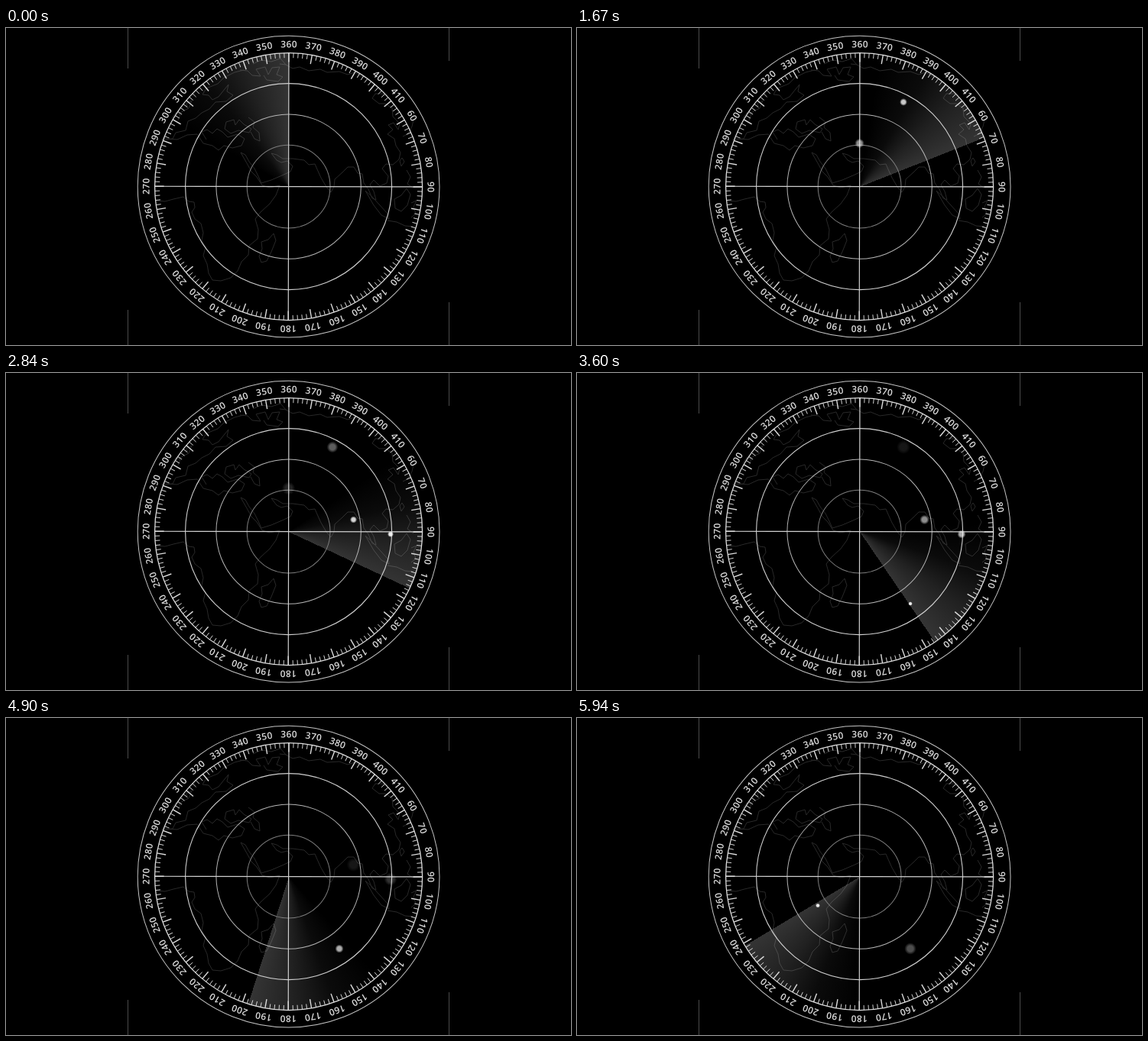
Write an HTML page that moves like this. It is 739 px wide and 415 px high and loops after 5.97 s.

```html
<!DOCTYPE html>
<html lang="en">
<head>
<meta charset="utf-8">
<title>Radar sweep</title>
<style>
  html, body { margin: 0; width: 100%; height: 100%; overflow: hidden; background: #000; }
  #stage { position: relative; width: 739px; height: 415px; overflow: hidden; background: #000; }
  svg { position: absolute; left: 0; top: 0; }
  #sweep {
    position: absolute; left: 194.5px; top: 32.5px; width: 350px; height: 350px; border-radius: 50%;
    background: conic-gradient(transparent 300deg, rgba(255,255,255,.045) 322deg,
      rgba(255,255,255,.13) 340deg, rgba(255,255,255,.205) 360deg);
  }
  #map path { fill: none; stroke: #292929; stroke-width: 1; stroke-linejoin: round; }
  #dial { fill: none; stroke: #dcdcdc; }
  #dial text {
    fill: #dcdcdc; stroke: none; text-anchor: middle; letter-spacing: .4px;
    font: 600 12px "Open Sans", "Noto Sans", sans-serif;
  }
</style>
</head>
<body>
<div id="stage">
  <svg id="map" width="739" height="415">
    <!-- Africa and Madagascar -->
    <path d="M196 226L208 227 219 224 232 221 239 227 246 228 247 235 243 241 247 250 255 256 258 268 256 278 261 287 258 298 263 309 265 321 270 330 281 331 294 327 303 318 308 306 317 297 318 285 329 276 330 264 326 250 333 241 345 230 353 219 358 206 345 209 335 206 328 195 321 188 315 177 307 163"/>
    <path d="M350 269L353 278 347 293 341 305 334 307 331 299 335 289 334 280 343 277Z"/>
    <!-- Arabia, India and the bay -->
    <path d="M307 163L313 166 318 175 325 184 330 194 334 203 347 199 361 193 372 188 375 181 368 174 360 176 354 173 347 164 354 166 362 171 375 171 390 173 396 179 404 178 407 185 412 196 419 208 425 215 429 208 430 198 440 189 447 182 455 182 460 190 466 191 468 203 474 211 479 223 484 225 481 214 476 205 481 199 489 207 498 203 500 194 492 184 497 178 506 179"/>
    <!-- Eastern coast and islands -->
    <path d="M506 179L514 172 516 163 510 154 508 145 499 139 506 133 500 127 507 124 513 133 515 125 506 116 505 105 496 99 488 99 479 92 483 86 495 86"/>
    <path d="M519 142L525 139 531 129 533 120M518 170L521 175 517 181 515 174ZM524 186L529 195 525 204 533 210"/>
    <path d="M470 213L479 221 489 232 499 243 501 250 491 245 481 232ZM499 252L511 254 522 259 533 260M508 224L517 219 524 210 529 218 525 232 517 240 509 236ZM530 229L537 226 533 234 536 243 530 248"/>
    <!-- Europe and the inland seas -->
    <path d="M203 146L218 145 222 137 235 134 238 122 248 118 256 111 266 106 274 97 288 96 297 88 289 83 291 74 286 80 278 90 270 94 265 88 257 87 262 79 277 73 285 65 299 58 311 55"/>
    <path d="M207 145L224 146 237 140 250 139 258 151 270 154 278 160 285 154 296 157 308 154 312 145 303 139 290 143 283 136 276 132 270 138 263 133 256 136 262 146"/>
    <path d="M286 132L288 123 298 120 300 127 305 120 311 126 321 132 318 137 304 134 294 138ZM317 117L325 123 323 130 331 137 332 148 325 145 320 136"/>
    <path d="M226 112L239 105 243 95 236 99 238 106M217 118L222 111 228 113 225 121"/>
    <!-- Northern coast -->
    <path d="M306 55L316 56 322 62 333 63 327 54 339 51 343 61 348 52 358 51 354 61 362 64 356 70 341 68 337 62M323 47L334 42 347 44 359 40 366 48 358 47"/>
    <path d="M366 48L375 53 384 51 396 56 411 54 420 58 436 57 447 61 456 58 468 65"/>
  </svg>
  <div id="sweep"></div>
  <svg width="739" height="415">
    <defs>
      <radialGradient id="glow">
        <stop offset=".5" stop-color="#f4f4f4"/>
        <stop offset="1" stop-color="#f4f4f4" stop-opacity="0"/>
      </radialGradient>
    </defs>
    <path d="M159.5 0V53M159.5 369V415M579.5 0V43M579.5 359V415" stroke="#4a4a4a"/>
    <g id="dial" transform="translate(369.6 207.6) rotate(.12)">
      <circle r="197.4" stroke="#c4c4c4"/>
      <circle r="175" stroke-width="1.3"/>
      <circle r="135" stroke="#d0d0d0" stroke-width="1.1"/>
      <circle r="94.7" stroke="#b4b4b4"/>
      <circle r="54.4" stroke="#7c7c7c"/>
      <path d="M-175 0H175M0-175V175" stroke="#d0d0d0" stroke-width="1.2"/>
    </g>
    <g id="blips" fill="url(#glow)"></g>
  </svg>
</div>
<script>
const LOOP = 5970;
const STEP = 4 / 3;            // degrees per 1/30 s
const LEAD = 1.3;              // ticks the beam is ahead once it moves
const CENTER = [369.5, 207.5];

function add(parent, tag, attrs, text) {
  const el = document.createElementNS("http://www.w3.org/2000/svg", tag);
  for (const key in attrs) el.setAttribute(key, attrs[key]);
  if (text !== undefined) el.textContent = text;
  return parent.appendChild(el);
}

const dial = document.getElementById("dial");
for (let deg = 0; deg < 360; deg += 2) {
  const major = deg % 10 === 0;
  const turn = `rotate(${deg})`;
  add(dial, "path", {
    d: `M0-175V${major ? -163 : -168.5}`,
    "stroke-width": major ? 1.4 : .9,
    transform: turn
  });
  if (major) add(dial, "text", { x: .2, y: -182, transform: turn }, deg < 60 ? deg + 360 : deg);
}

const blipLayer = document.getElementById("blips");
const blips = [[369.5, 151], [427, 97], [454.5, 192], [503, 211], [436, 302], [315, 245.5]].map(([x, y]) => {
  const bearing = Math.atan2(x - CENTER[0], CENTER[1] - y) * 180 / Math.PI;
  const born = Math.max(1, (bearing + 360) % 360 / STEP - LEAD);
  return { born, el: add(blipLayer, "circle", { cx: x, cy: y }) };
});

// Two of every three ticks are shown; the skipped one shifts midway.
function tickAt(ms) {
  const n = Math.floor(ms * .03 + .15);
  const skipped = n < 100 ? n > 0 && n % 3 === 0 : n % 3 === 2;
  return skipped ? n - 1 : n;
}

const sweep = document.getElementById("sweep");
function draw(ms) {
  const n = tickAt(ms);
  sweep.style.transform = `rotate(${n ? (n + LEAD) * STEP : 0}deg)`;
  for (const { born, el } of blips) {
    const age = (n - born) / 30;
    const alpha = age < 0 ? 0 : Math.max(0, Math.min(.97, 1.2 - .375 * age));
    el.setAttribute("opacity", alpha);
    el.setAttribute("r", Math.max(0, 2.8 + 2.1 * age));
  }
}

const start = performance.now();
function loop() {
  draw((performance.now() - start) % LOOP);
  requestAnimationFrame(loop);
}
loop();
</script>
</body>
</html>
```
